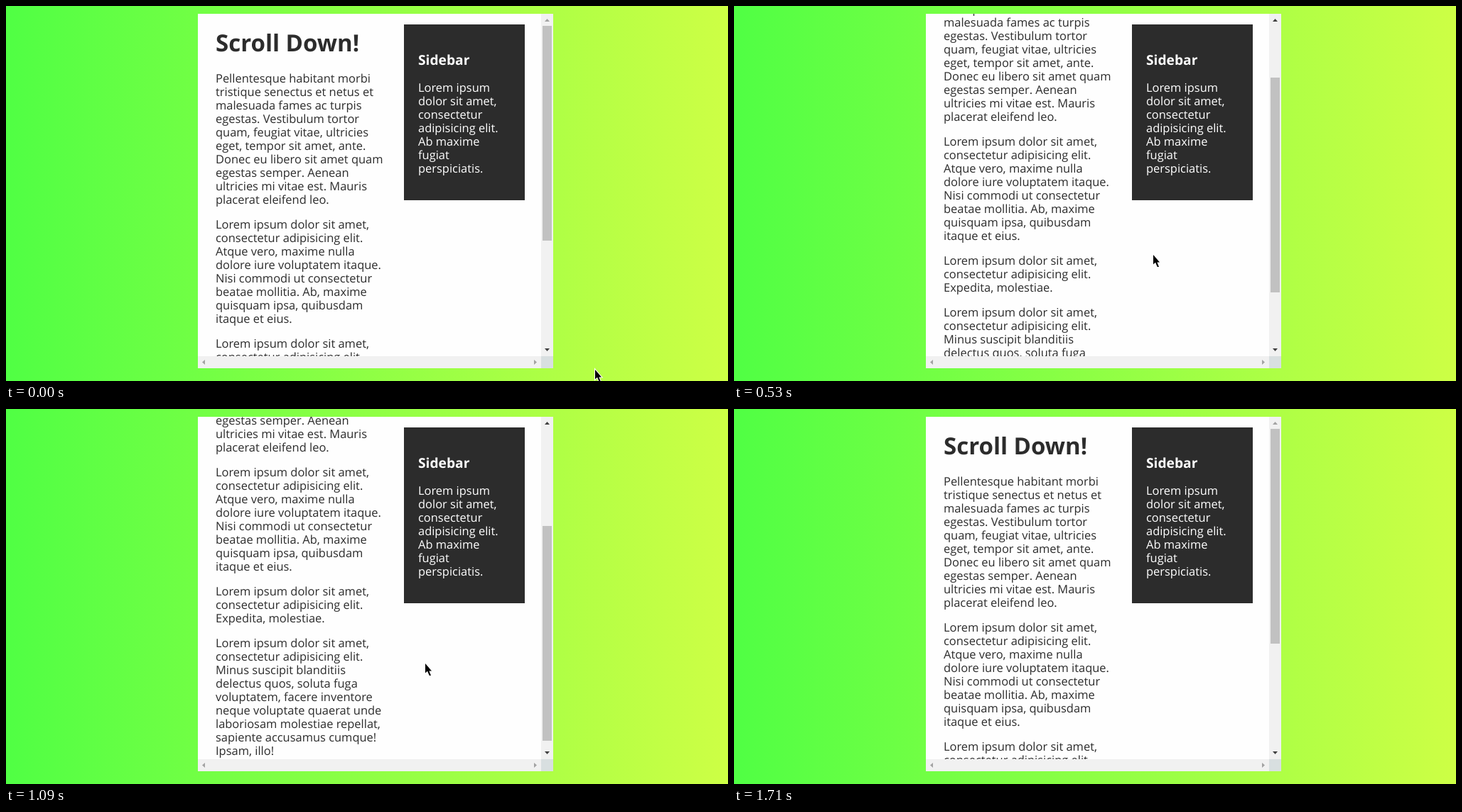
Animation of 1016 by 529 pixels, one loop 2.05 s. Source, as an HTML page:

```html
<!DOCTYPE html>
<html lang="en">
<head>
<meta charset="utf-8">
<title>Scroll Down</title>
<style>
  html, body { margin: 0; width: 100%; height: 100%; overflow: hidden; }
  svg { display: block; width: 1016px; height: 529px; }
  text { font: 16.45px "Open Sans", "Noto Sans", sans-serif; fill: #2c2c2c; white-space: pre; text-rendering: geometricPrecision; }
  .title { font-size: 33px; font-weight: 700; }
  .side text { fill: #fff; }
  .side .heading { font-size: 19.2px; font-weight: 700; }
</style>
</head>
<body>
<svg viewBox="0 0 1016 529">
  <defs>
    <linearGradient id="sky">
      <stop offset="0" stop-color="#50ff44"/>
      <stop offset="1" stop-color="#cdff45"/>
    </linearGradient>
    <clipPath id="view"><rect x="270" y="11" width="483" height="483"/></clipPath>
  </defs>
  <rect width="1016" height="529" fill="url(#sky)"/>
  <rect x="270" y="11" width="500" height="500" fill="#fefefe"/>
  <g clip-path="url(#view)">
    <g id="article"><text class="title" x="295" y="64">Scroll Down!</text></g>
  </g>
  <g class="side" id="side">
    <rect x="560" y="26" width="170" height="248" fill="#2c2c2c"/>
    <text class="heading" x="580" y="83">Sidebar</text>
  </g>
  <path d="M753 11h17v483h-17zM270 494h483v17h-483z" fill="#f1f1f1"/>
  <rect x="753" y="494" width="17" height="17" fill="#d8dfe0"/>
  <rect id="thumb" x="755" y="28" width="13" height="303" fill="#c1c1c1"/>
  <path d="M280 499v7l-4-3.5zM743 499v7l4-3.5z" fill="#a3a3a3"/>
  <path id="up" d="M758 22h7l-3.5-4z"/>
  <path id="down" d="M758 483h7l-3.5 4z"/>
  <path id="cursor" d="M0 0V13.5L3 10.8L5.7 17H8L5.4 10.5H9Z" stroke="#fff" stroke-width="2" paint-order="stroke"/>
</svg>
<script>
const LOOP = 2050, MAX_SCROLL = 232, THUMB_TRAVEL = 146;
const $ = id => document.getElementById(id);

const paragraphs = [
  [108, `Pellentesque habitant morbi
tristique senectus et netus et
malesuada fames ac turpis
egestas. Vestibulum tortor
quam, feugiat vitae, ultricies
eget, tempor sit amet, ante.
Donec eu libero sit amet quam
egestas semper. Aenean
ultricies mi vitae est. Mauris
placerat eleifend leo.`],
  [314, `Lorem ipsum dolor sit amet,
consectetur adipisicing elit.
Atque vero, maxime nulla
dolore iure voluptatem itaque.
Nisi commodi ut consectetur
beatae mollitia. Ab, maxime
quisquam ipsa, quibusdam
itaque et eius.`],
  [482, `Lorem ipsum dolor sit amet,
consectetur adipisicing elit.
Expedita, molestiae.`],
  [555, `Lorem ipsum dolor sit amet,
consectetur adipisicing elit.
Minus suscipit blanditiis
delectus quos, soluta fuga
voluptatem, facere inventore
neque voluptate quaerat unde
laboriosam molestiae repellat,
sapiente accusamus cumque!
Ipsam, illo!`]
];
const sideText = `Lorem ipsum
dolor sit amet,
consectetur
adipisicing elit.
Ab maxime
fugiat
perspiciatis.`;

function addLines(parent, x, y, copy) {
  copy.split("\n").forEach((line, i) => {
    const text = document.createElementNS("http://www.w3.org/2000/svg", "text");
    text.setAttribute("x", x);
    text.setAttribute("y", y + 19 * i);
    text.textContent = line;
    parent.append(text);
  });
}
paragraphs.forEach(([y, copy]) => addLines($("article"), 295, y, copy));
addLines($("side"), 580, 121, sideText);

// Held poses: start time, pointer x, pointer y, scroll offset
const poses = [
  [0, 829, 513, 0],
  [70, 808, 500, 0],
  [150, 735, 449, 0],
  [230, 650, 390, 0],
  [310, 603, 359, 0],
  [390, 590, 351, 0],
  [450, 590, 351, 50],
  [530, 590, 351, 117],
  [600, 590, 352, 160],
  [680, 590, 354, 196],
  [760, 590, 356, 218],
  [840, 590, 358, 229],
  [920, 590, 358, 232],
  [1090, 590, 359, 219],
  [1160, 590, 359, 100],
  [1240, 590, 359, 0.4],
  [1320, 590, 359, 0],
  [1480, 628, 378, 0],
  [1560, 770, 440, 0],
  [1640, 948, 514, 0],
  [1710, 1040, 560, 0]
];

function render(time) {
  const [, x, y, scroll] = poses.findLast(pose => pose[0] <= time);
  const arrow = active => active ? "#404040" : "#a3a3a3";
  $("article").setAttribute("transform", `translate(0 ${-Math.round(scroll)})`);
  $("thumb").setAttribute("y", 28 + Math.floor(scroll / MAX_SCROLL * THUMB_TRAVEL));
  $("up").setAttribute("fill", arrow(scroll > 0));
  $("down").setAttribute("fill", arrow(scroll < MAX_SCROLL));
  $("cursor").setAttribute("transform", `translate(${x} ${y})`);
}

let start;
function tick(now) {
  start ??= now;
  render(Math.max(0, now - start) % LOOP);
  requestAnimationFrame(tick);
}
render(0);
requestAnimationFrame(tick);
</script>
</body>
</html>
```
